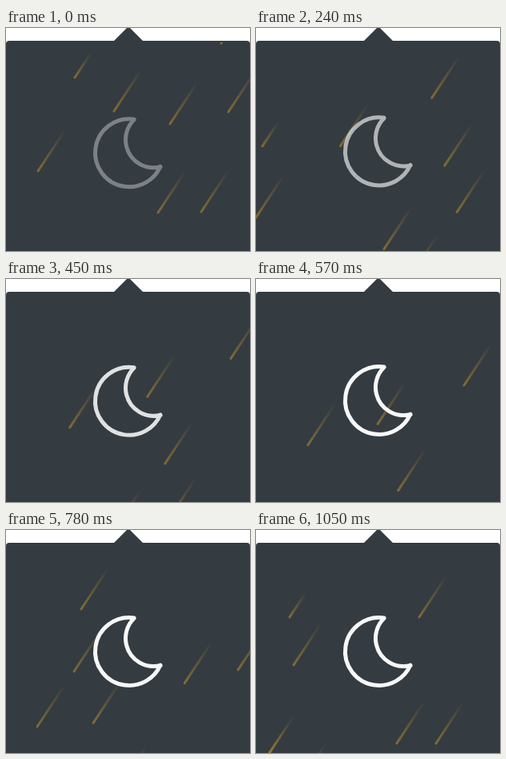
These frames come from a looping animation (305x279 px, 1.08 s). An HTML page with a canvas:

```html
<!DOCTYPE html>
<html lang="en">
<head>
<meta charset="utf-8">
<title>Night sky</title>
<style>
  html, body { margin: 0; width: 100%; height: 100%; overflow: hidden; background: #fff; }
  canvas { display: block; width: 305px; height: 279px; }
</style>
</head>
<body>
<canvas id="stage" width="305" height="279"></canvas>
<script>
const ctx = document.getElementById('stage').getContext('2d');
const LOOP = 1080, STEP = 30, RISE = 555;
const TAIL = 63, SHORT = 37;
const SKY = '#343b41';

// Head position (x, y) at time t, velocity in px/ms, tail length, first visible time
const meteors = [
  { t: 0, x: 269, y: 19, vx: -.205, vy: .285 },
  { t: 0, x: 278, y: 105, vx: -.176, vy: .28 },
  { t: 0, x: 135, y: 104, vx: -.123, vy: .182 },
  { t: 0, x: 40, y: 179, vx: -.167, vy: .242 },
  { t: 0, x: 190, y: 231, vx: -.125, vy: .19 },
  { t: 0, x: 244, y: 230, vx: -.217, vy: .342 },
  { t: 0, x: 307, y: 148, vx: -.233, vy: .343 },
  { t: 0, x: 86, y: 62, vx: -.325, vy: .358, len: SHORT },
  { t: 0, x: 205, y: 120, vx: -.717, vy: 1.017 },
  { t: 570, x: 260, y: 133, vx: -.175, vy: .279, born: 335 },
  { t: 780, x: 94, y: 99, vx: -.174, vy: .259, born: 630 },
  { t: 780, x: 85, y: 177, vx: -.267, vy: .4, born: 630 },
  { t: 780, x: 290, y: 175, vx: -.241, vy: .341, born: 570 },
  { t: 900, x: 257, y: 37, vx: -.353, vy: .48, born: 780 },
  { t: 1050, x: 42, y: 109, vx: -.325, vy: .358, len: SHORT, born: 905 }
];

function drawPanel() {
  ctx.fillStyle = SKY;
  ctx.beginPath();
  ctx.roundRect(0, 16, 305, 270, 4);
  ctx.fill();
  ctx.beginPath();
  ctx.moveTo(134, 17);
  ctx.lineTo(151, 0);
  ctx.lineTo(155, 0);
  ctx.lineTo(172, 17);
  ctx.fill();
}

function drawMeteor({ t, x, y, vx, vy, len = TAIL, born = -LOOP }, now) {
  if (now < born) return;
  const hx = x + vx * (now - t), hy = y + vy * (now - t);
  const tx = hx + len * .55, ty = hy - len * .835;
  const glow = ctx.createLinearGradient(hx, hy, tx, ty);
  glow.addColorStop(0, 'rgba(190,145,45,.55)');
  glow.addColorStop(1, 'rgba(190,145,45,0)');
  ctx.globalAlpha = Math.min(1, (now - born) / 60);
  ctx.strokeStyle = glow;
  ctx.lineWidth = 3;
  ctx.beginPath();
  ctx.moveTo(hx, hy);
  ctx.lineTo(tx, ty);
  ctx.stroke();
}

function drawMoon(now) {
  const p = Math.min(1, now / RISE);
  const arcTo = (cx, cy, r, from, to, back) => ctx.arc(cx, cy, r,
    Math.atan2(from[1] - cy, from[0] - cx), Math.atan2(to[1] - cy, to[0] - cx), back);
  const top = [160, 110], tip = [193, 169];
  ctx.save();
  ctx.translate(0, 4.2 * (1 - p));
  ctx.globalAlpha = .37 + .63 * p;
  ctx.strokeStyle = '#f8f8f8';
  ctx.lineWidth = 5;
  ctx.beginPath();
  arcTo(154, 152, 42.5, top, tip, true);
  arcTo(184.5, 135.5, 35, tip, top, false);
  ctx.closePath();
  ctx.stroke();
  ctx.restore();
}

function draw(now) {
  ctx.globalAlpha = 1;
  ctx.clearRect(0, 0, 305, 279);
  drawPanel();
  ctx.save();
  ctx.beginPath();
  ctx.rect(0, 18, 305, 261);
  ctx.clip();
  meteors.forEach(m => drawMeteor(m, now));
  ctx.restore();
  drawMoon(now);
}

ctx.lineCap = ctx.lineJoin = 'round';
const start = performance.now();
function tick() {
  const now = (performance.now() - start) % LOOP;
  draw(Math.floor(now / STEP) * STEP);
  requestAnimationFrame(tick);
}
tick();
</script>
</body>
</html>
```
